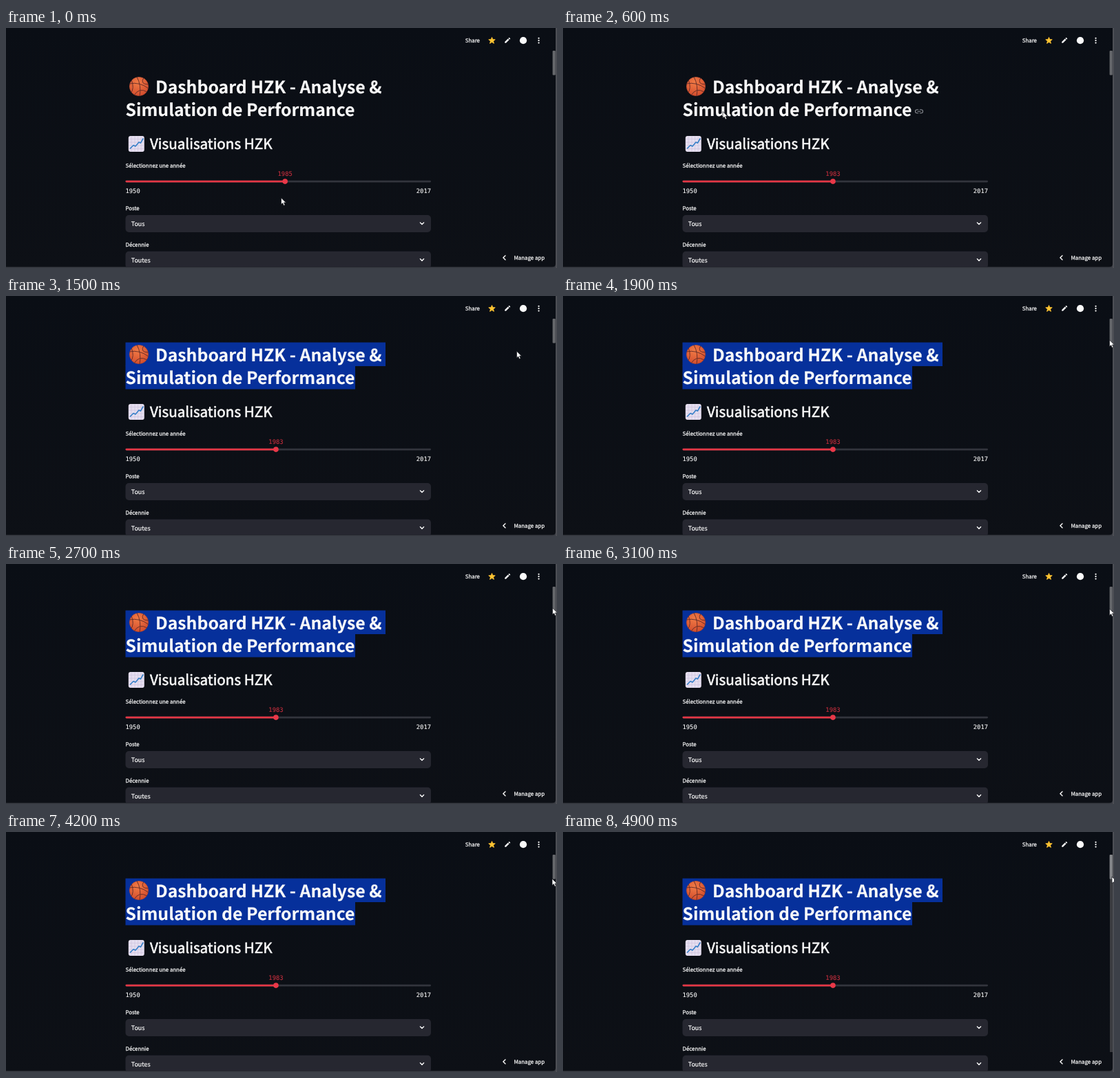
An HTML page that plays this animation: 800 px wide and 349 px high, repeating every 5000 ms.

```html
<!DOCTYPE html>
<html lang="fr">
<head>
<meta charset="utf-8">
<title>Dashboard</title>
<style>
  html, body { margin: 0; width: 100%; height: 100%; overflow: hidden; background: #0c0f15; }
  svg { display: block; width: 100%; height: 100%; }
  text { font-family: "Noto Sans CJK JP", "Noto Sans CJK SC", "Noto Sans", sans-serif; fill: #fafafa; stroke: #fafafa; text-rendering: geometricPrecision; white-space: pre; }
  .h1 { font-size: 24.78px; font-weight: 700; stroke-width: .15px; }
  .h2 { font-size: 20.65px; stroke-width: .6px; }
  .label { font-size: 7.85px; stroke-width: .25px; }
  .body { font-size: 8.95px; stroke-width: .2px; }
  .mono { font-family: "DejaVu Sans Mono", "Noto Sans Mono", monospace; font-size: 8.8px; stroke-width: .1px; }
  #year { fill: #c9303f; stroke: #c9303f; }
  .line { fill: none; stroke: #fafafa; stroke-width: 1.4; stroke-linecap: round; stroke-linejoin: round; }
</style>
</head>
<body>
<svg viewBox="0 0 800 349" preserveAspectRatio="none">
  <defs>
    <linearGradient id="page" x2="0" y2="1">
      <stop offset="0" stop-color="#0a0e15"/>
      <stop offset="1" stop-color="#0d1016"/>
    </linearGradient>
    <linearGradient id="fade" gradientUnits="userSpaceOnUse" x1="230" x2="550" y1="0" y2="0">
      <stop offset="0" stop-color="#fff" stop-opacity=".04"/>
      <stop offset="1" stop-color="#fff" stop-opacity=".33"/>
    </linearGradient>
    <mask id="ghostMask" maskUnits="userSpaceOnUse" x="0" y="0" width="800" height="349">
      <rect width="800" height="113" fill="url(#fade)"/>
      <rect y="113" width="800" height="49" fill="url(#fade)" opacity=".25"/>
    </mask>
    <radialGradient id="ballFill" cx=".42" cy=".3" r=".75">
      <stop offset="0" stop-color="#f07a45"/>
      <stop offset="1" stop-color="#d04a2c"/>
    </radialGradient>
    <clipPath id="ballClip"><circle cx="193" cy="85" r="14"/></clipPath>
    <clipPath id="view"><path d="M0 0H798V343Q798 347.5 793 347.5H0Z"/></clipPath>
  </defs>

  <rect width="800" height="349" fill="#3a3d44"/>
  <rect x="798" width="2" height="349" fill="#4c4e54"/>
  <g clip-path="url(#view)">
    <rect width="800" height="349" fill="url(#page)"/>

    <rect id="track" x="794" y="33" width="4" height="287" fill="#3b3c40"/>
    <rect id="thumb" x="793.6" y="33" width="4.2" height="35.5" rx="1" fill="#66686c"/>

    <text class="label" x="666.8" y="21">Share</text>
    <path id="star" fill="#ffc532" stroke="#ffc532" stroke-width=".8" stroke-linejoin="round"/>
    <path transform="translate(728.2 18) scale(.88) translate(-728.5 -17.6)" d="M724 22V20L729.2 14.8 731.2 16.8 726 22ZM729.9 14.1L730.9 13.1Q731.4 12.8 731.8 13.2L732.8 14.2Q733.2 14.6 732.9 15.1L731.9 16.1Z" fill="#fafafa"/>
    <circle cx="751" cy="18.2" r="5.1" fill="#fafafa"/>
    <g fill="#fafafa">
      <circle cx="773.5" cy="14.8" r="1.15"/><circle cx="773.5" cy="18.2" r="1.15"/><circle cx="773.5" cy="21.6" r="1.15"/>
    </g>

    <g fill="#06309b">
      <rect id="sel1" x="173.5" y="67.5" height="34.5"/>
      <rect id="sel2" x="173.5" y="101.5" height="34"/>
    </g>

    <g id="ghost">
      <text class="label" x="666.8" y="21" opacity=".22">Share</text>
    </g>
    <g id="ghostTitle" mask="url(#ghostMask)">
      <use id="ghostText" href="#title"/>
    </g>

    <g clip-path="url(#ballClip)">
      <circle cx="193" cy="85" r="14" fill="url(#ballFill)"/>
      <g fill="none" stroke="#5e2a28" stroke-width=".9">
        <path d="M179 81Q194 78 207 88M190 71Q197 84 194 99M182 75Q187 88 181 95M200 72Q194 82 207 82M186 98Q193 86 205 93"/>
        <circle cx="193" cy="85" r="13.7" stroke-width=".6" opacity=".5"/>
      </g>
    </g>
    <g id="title">
      <text class="h1" x="217" y="94.7">Dashboard HZK - Analyse &amp;</text>
      <text class="h1" x="173.5" y="127.8">Simulation de Performance</text>
    </g>
    <g id="link" fill="none" stroke="#8b8e95" stroke-width="1.1" stroke-linecap="round">
      <path d="M515.7 118.7H514A2.5 2.5 0 0 0 514 123.7H515.7M518.3 118.7H520A2.5 2.5 0 0 1 520 123.7H518.3M515 121.2H519"/>
    </g>

    <rect x="177.8" y="157" width="23" height="23" rx="3" fill="#e6dff0"/>
    <path id="grid" fill="none" stroke="#cbbfdc" stroke-width=".6"/>
    <path d="M180 175.5L185 170.5 188 172 193 166 195.5 167.2 199.3 160.5" fill="none" stroke="#357fc8" stroke-width="1.6" stroke-linejoin="round"/>
    <text class="h2" x="209" y="176.2">Visualisations HZK</text>

    <text class="label" x="173.5" y="202.5">Sélectionnez une année</text>
    <rect x="173.5" y="221.8" width="443.5" height="2.6" rx="1.3" fill="#33353d"/>
    <rect id="fill" x="173.5" y="221.8" height="2.6" rx="1.3" fill="#e43645"/>
    <circle id="knob" cy="223.1" r="3.8" fill="#e93848"/>
    <text id="year" class="mono" y="215.2" text-anchor="middle"></text>
    <text class="mono" x="173.5" y="240">1950</text>
    <text class="mono" x="617" y="240" text-anchor="end">2017</text>

    <text class="label" x="173.5" y="264.7">Poste</text>
    <rect x="173.5" y="272" width="443.5" height="25" rx="5" fill="#262730"/>
    <text class="body" x="181.7" y="287.7">Tous</text>
    <path class="line" d="M601.4 283L604 285.6 606.6 283"/>

    <text class="label" x="173.5" y="317.6">Décennie</text>
    <rect x="173.5" y="324.7" width="443.5" height="25" rx="5" fill="#262730"/>
    <text class="body" x="181.7" y="340.5">Toutes</text>
    <path class="line" d="M601.4 335.8L604 338.4 606.6 335.8"/>

    <path class="line" d="M725 330.9L721.9 334 725 337.1"/>
    <text class="label" x="737.5" y="337">Manage app</text>
  </g>

  <path id="arrow" d="M0 0V9.6L2.2 7.6 3.8 11.2 5.6 10.4 4 6.9H7Z" fill="#fff" stroke="#16181d" stroke-width=".7" stroke-linejoin="round"/>
  <g id="banned">
    <circle r="4.2" fill="#fff" stroke="#c92c35" stroke-width="1.6"/>
    <path d="M-2.8 -2.8L2.8 2.8" stroke="#c92c35" stroke-width="1.6"/>
  </g>
</svg>
<script>
const LOOP = 5000, STEP = 100;
const $ = id => document.getElementById(id);
const set = (id, attrs) => { for (const k in attrs) $(id).setAttribute(k, attrs[k]); };
const show = (id, on) => set(id, { visibility: on ? "visible" : "hidden" });
const clamp = (v, lo, hi) => Math.min(hi, Math.max(lo, v));

// Pointer path: time, x, y
const path = [
  [0, 399.5, 247], [200, 405, 223], [400, 392, 223], [700, 176, 86],
  [1000, 520, 122], [1100, 593, 127], [1700, 793.5, 64], [3000, 793.5, 64],
  [3500, 793.5, 75], [3800, 793.5, 75], [4100, 793, 68], [4600, 793, 68],
  [4900, 797, 65], [5000, 797, 65]
];

function pointer(t) {
  const i = Math.max(1, path.findIndex(p => p[0] > t));
  const [t0, x0, y0] = path[i - 1], [t1, x1, y1] = path[i];
  const u = (t - t0) / (t1 - t0), e = u * u * (3 - 2 * u);
  return [x0 + (x1 - x0) * e, y0 + (y1 - y0) * e];
}

function drawStatic() {
  let star = "";
  for (let i = 0; i < 10; i++) {
    const r = i % 2 ? 2.2 : 5, a = i * Math.PI / 5 - Math.PI / 2;
    star += (i ? "L" : "M") + (705.5 + r * Math.cos(a)) + " " + (18.4 + r * Math.sin(a));
  }
  set("star", { d: star + "Z" });
  let grid = "";
  for (let i = 1; i < 5; i++) {
    const d = i * 4.6;
    grid += `M${177.8 + d} 157.5V179.5M178.3 ${157 + d}H200.3`;
  }
  set("grid", { d: grid });
}

function draw(t) {
  const [x, y] = pointer(t);
  const dragging = t >= 3200 && t < 3900;

  const year = t < 300 ? 1985 : t < 400 ? 1984 : 1983;
  const knobX = 173.5 + 443.5 * (year - 1950) / 67;
  set("fill", { width: knobX - 173.5 });
  set("knob", { cx: knobX });
  set("year", { x: knobX });
  $("year").textContent = year;

  const selecting = t >= 700, done = t >= 1000;
  const secondLine = done || (selecting && y > 101.5);
  set("sel1", { width: !selecting ? 0 : secondLine ? 377.5 : clamp(x - 173.5, 0, 377.5) });
  set("sel2", { width: done ? 333.5 : secondLine ? clamp(x - 173.5, 0, 333.5) : 0 });
  show("link", x > 173 && x < 617 && y > 67 && y < 136);

  const shift = `translate(0 ${y - 64})`;
  set("ghost", { transform: shift });
  set("ghostText", { transform: shift });
  show("ghost", dragging);
  set("ghostTitle", { display: dragging ? "inline" : "none" });

  const hover = t >= 4900;
  show("track", hover);
  set("thumb", { fill: hover ? "#85878a" : "#66686c" });

  set("arrow", { transform: `translate(${x} ${y})` });
  set("banned", { transform: `translate(${x} ${y})` });
  show("arrow", !dragging);
  show("banned", dragging);
}

drawStatic();
const start = performance.now();
function tick() {
  const t = (performance.now() - start) % LOOP;
  draw(Math.floor(t / STEP) * STEP);
  requestAnimationFrame(tick);
}
tick();
</script>
</body>
</html>
```
